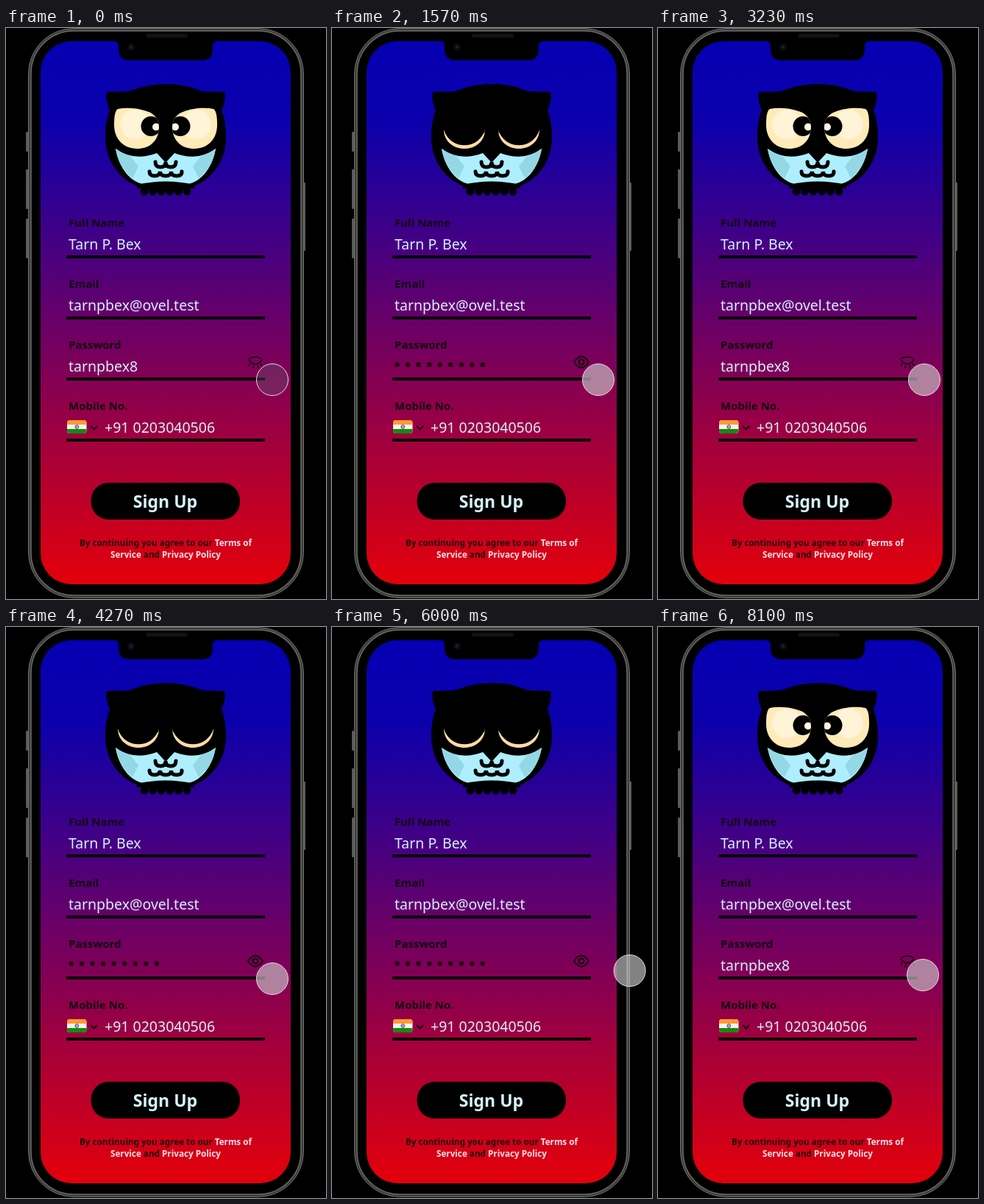
Animation of 435 by 776 pixels, one loop 8260 ms. Source, as an HTML page:

```html
<!DOCTYPE html>
<html lang="en">
<head>
<meta charset="utf-8">
<title>Sign up</title>
<style>
html, body { margin: 0; width: 100%; height: 100%; overflow: hidden; background: #000; }
svg { display: block; width: 100%; height: 100%; }
text { font-family: "Noto Sans", "Open Sans", sans-serif; font-weight: 600; }
.label { font-size: 15px; fill: #140010; }
.value { font-size: 19.5px; fill: #d8eeff; font-weight: 500; }
.terms { font-size: 11.7px; fill: #22000a; text-anchor: middle; }
.terms tspan { fill: #ffe0ea; }
.icon { fill: none; stroke: #14000a; stroke-width: 2; stroke-linecap: round; }
.thin { stroke-width: 1.5; }
</style>
</head>
<body>
<svg viewBox="0 0 435 776">
  <defs>
    <linearGradient id="sky" x1="0" y1="0" x2="0" y2="1">
      <stop offset="0" stop-color="#0500b2"/>
      <stop offset=".15" stop-color="#0c00ac"/>
      <stop offset=".6" stop-color="#7e0058"/>
      <stop offset="1" stop-color="#e4000a"/>
    </linearGradient>
    <clipPath id="eyeClip"><path id="eyeEdge"/></clipPath>
    <clipPath id="flagClip"><rect x="83" y="533" width="26.500" height="18" rx="4"/></clipPath>
    <g id="eye">
      <path id="iris"/>
      <g clip-path="url(#eyeClip)">
        <circle cx="175" cy="131" r="20" fill="#fff3d8"/>
        <circle cx="197" cy="133.500" r="13.500"/>
        <circle cx="204" cy="134.500" r="5" fill="#fff6e0"/>
      </g>
    </g>
  </defs>

  <!-- phone -->
  <g fill="#5a5a56">
    <rect x="27" y="141" width="3" height="27" rx="1"/>
    <rect x="27" y="192" width="3" height="54" rx="1"/>
    <rect x="27" y="259" width="3" height="54" rx="1"/>
    <rect x="404" y="210" width="3" height="93" rx="1"/>
  </g>
  <rect x="30.500" y=".5" width="374" height="774" rx="62" fill="#3a3a38" stroke="#73736f"/>
  <rect x="34" y="4" width="367" height="767" rx="58" fill="#000" stroke="#6b6b67" stroke-width="1.500"/>
  <rect x="190" y="8" width="57" height="5" rx="2.500" fill="#121212"/>
  <rect x="47" y="18" width="340" height="738" rx="42" fill="url(#sky)"/>
  <path d="M147 18H287Q281 18 281 24V29Q281 44 266 44H168Q153 44 153 29V24Q153 18 147 18Z"/>
  <circle cx="170" cy="26" r="5" fill="#0c0c12"/>
  <circle cx="170" cy="26" r="2" fill="#1a2236"/>

  <!-- owl -->
  <path d="M137 87C152 86 166 88 176 83C198 74 236 74 258 83C268 88 282 86 297 87C299 97 296 105 293 112
    C298 124 299 138 299 148C299 190 269 222 217 222C165 222 135 190 135 148C135 138 136 124 141 112C138 105 135 97 137 87Z"/>
  <path d="M188 222H246.500" stroke="#000" stroke-width="11" stroke-linecap="round" stroke-dasharray="0 11.600"/>
  <path d="M149 164Q174 182 205 170L217 183L229 170Q260 182 285 164C280 193 262 213 240 213H194C172 213 154 193 149 164Z" fill="#aeeeff"/>
  <path d="M149 164Q158 171 169 174L180 188L172 204Q153 189 149 164ZM285 164Q276 171 265 174L254 188L262 204Q281 189 285 164Z" fill="#94d8e6"/>
  <path d="M178 213Q217 204 256 213V218H178ZM205 168H229L217 183Z"/>
  <path d="M203 182q0 7 7 7t7-7q0 7 7 7t7-7M195 195q0 6 7 6t7.500-6q0 6 7.500 6t7.500-6q0 6 7.500 6t7-6"
    fill="none" stroke="#000" stroke-width="5" stroke-linecap="round"/>
  <use href="#eye"/>
  <use href="#eye" transform="translate(434 0) scale(-1 1)"/>

  <!-- form -->
  <g id="fields"></g>
  <g id="shown">
    <text class="value" x="85" y="467">tarnpbex8</text>
    <path class="icon thin" d="M330 451Q339 462 348 451M332 456L330 459M337 458L336 462M342 458L343 462M346 456L348 459M331 449Q339 445 347 449"/>
  </g>
  <g id="hidden">
    <path d="M88.500 457.500H206" stroke="#22000f" stroke-width="6.500" stroke-linecap="round" stroke-dasharray="0 14.550"/>
    <path class="icon" d="M329 454Q339 439 349 454Q339 469 329 454Z"/>
    <circle class="icon" cx="339" cy="454" r="3.500"/>
  </g>
  <g clip-path="url(#flagClip)">
    <rect x="83" y="533" width="27" height="18" fill="#f7f3f0"/>
    <rect x="83" y="533" width="27" height="6" fill="#ff9a30"/>
    <rect x="83" y="545" width="27" height="6" fill="#168a0c"/>
  </g>
  <circle cx="96.300" cy="542" r="2.300" fill="none" stroke="#20206a"/>
  <circle cx="96.300" cy="542" r=".8" fill="#20206a"/>
  <path class="icon" d="M115.500 541.500L119.500 545.500L123.500 541.500"/>
  <rect x="115.500" y="618" width="202.500" height="50" rx="24"/>
  <text x="216.500" y="652" font-size="23" text-anchor="middle" fill="#d6f4ff">Sign Up</text>
  <text class="terms" x="217" y="704">By continuing you agree to our <tspan>Terms of</tspan></text>
  <text class="terms" x="217" y="720"><tspan>Service</tspan> and <tspan>Privacy Policy</tspan></text>

  <circle id="cursor" r="21.500" stroke="#e6d6e0" stroke-width="1"/>
</svg>
<script>
const $ = id => document.getElementById(id);
const LOOP = 8260;
const PRESSES = [-80, 1780, 3430, 7080];
// time, x, y
const PATH = [[4450, 362, 478], [4900, 470, 463], [5740, 470, 463],
              [5830, 451, 464.5], [6000, 405, 467], [6400, 360, 473]];
const EYE_OPEN = [147,132, 147,120,148,113,152,110, 168,107,186,110,198,116,
                  206,122,208,128,208,136, 207,154,195,164,178,164, 159,164,147,150,147,132];
const EYE_SHUT = [152,138, 154,145,158,150,163,154, 172,161,188,161,197,154,
                  202,150,206,145,208,138, 208,154,195,164,180,164, 165,164,152,154,152,138];

const clamp = v => Math.max(0, Math.min(1, v));
const mix = (a, b, k) => a + (b - a) * k;
const mixAll = (a, b, k) => a.map((v, i) => mix(v, b[i], k));
const easeOut = v => 1 - (1 - clamp(v)) ** 3;

const FIELDS = [["Full Name", "Tarn P. Bex"], ["Email", "tarnpbex@ovel.test"],
                ["Password", ""], ["Mobile No.", "+91 0203040506"]];
$("fields").innerHTML = FIELDS.map(([label, value], i) => {
  const y = 270 + 83 * i;
  return `<text class="label" x="85" y="${y}">${label}</text>
    <text class="value" x="${i == 3 ? 134 : 85}" y="${y + 31}">${value}</text>
    <rect x="82" y="${y + 39}" width="270" height="4"/>`;
}).join("");

function cursorAt(t) {
  const i = PATH.findIndex(p => p[0] > t);
  if (i == 0) return PATH[0].slice(1);
  if (i < 0) return PATH.at(-1).slice(1);
  const [a, b] = [PATH[i - 1], PATH[i]];
  let k = (t - a[0]) / (b[0] - a[0]);
  if (i == 1) k = k * k * (3 - 2 * k);
  if (i == PATH.length - 1) k = easeOut(k);
  return mixAll(a, b, k).slice(1);
}

function draw(t) {
  let open = 1, press = 0;
  PRESSES.forEach((p, i) => {
    const k = easeOut((t - p - 140) / 380);
    open += i % 2 ? k : -k;
    press += clamp((t - p) / 60) * clamp((p + 200 - t) / 60);
  });

  const d = mixAll(EYE_SHUT, EYE_OPEN, open);
  const path = `M${d.slice(0, 2)}C${d.slice(2)}Z`;
  $("iris").setAttribute("d", path);
  $("eyeEdge").setAttribute("d", path);
  $("iris").setAttribute("fill", `rgb(${mixAll([255, 220, 165], [255, 234, 184], open)})`);
  $("shown").setAttribute("opacity", open);
  $("hidden").setAttribute("opacity", 1 - open);

  const [x, y] = cursorAt(t);
  $("cursor").setAttribute("transform", `translate(${x} ${y})`);
  $("cursor").setAttribute("fill", `rgba(${mixAll([200, 200, 200, .65], [95, 85, 110, .4], press)})`);
}

const start = performance.now();
function frame() {
  draw((performance.now() - start) % LOOP);
  requestAnimationFrame(frame);
}
frame();
</script>
</body>
</html>
```
